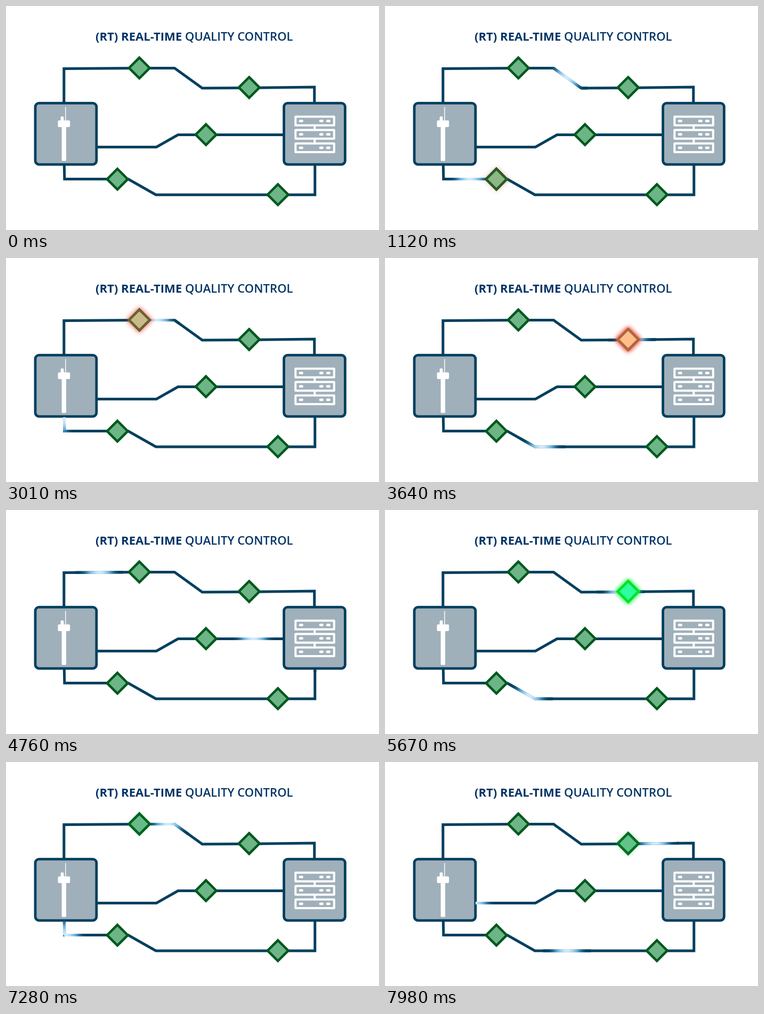
Write an HTML page with a canvas that moves like this. It is 700 px wide and 420 px high and loops after 8 s.

```html
<!DOCTYPE html>
<html lang="en">
<head>
<meta charset="utf-8">
<title>Real-time quality control</title>
<style>
  html, body { margin: 0; width: 100%; height: 100%; overflow: hidden; background: #fff; }
  canvas, svg { position: absolute; left: 0; top: 0; display: block; }
  text { font: 600 22.1px "Open Sans", sans-serif; fill: #003366; }
  .strong { font-weight: 700; }
</style>
</head>
<body>
<canvas id="stage" width="700" height="420"></canvas>
<svg width="700" height="420" viewBox="0 0 700 420">
  <text x="168" y="65"><tspan class="strong">(RT) REAL-TIME</tspan> QUALITY CONTROL</text>
</svg>
<script>
const ctx = document.getElementById('stage').getContext('2d');
ctx.translate(0.3, 0.5);

const LOOP = 8000, TICK = 70, PERIOD = 2100, HALF_PULSE = 45;
const PASS_FROM = 4000; // checks fail (orange) before this time and pass (green) after it
const NAVY = [0, 63, 94], SKY = [105, 175, 220], SHINE = [208, 236, 252];
const IDLE = { fill: [109, 181, 134], edge: [0, 88, 30] };
const FAIL = { fill: [255, 190, 140], edge: [172, 104, 58], glow: '245,45,35' };
const PASS = { fill: [46, 255, 160], edge: [0, 228, 40], glow: '30,240,80' };

// first: time the pulse centre enters; speed in px per ms; checks: [x, y, distance along the track]
const tracks = [
  { points: [[108.5, 180], [108.5, 117], [250, 116], [316, 116], [368, 153.5], [456, 153], [578.5, 151.5], [578.5, 180]],
    first: 140, speed: 0.307, checks: [[250, 115.7, 206], [456, 152.3, 424]] },
  { points: [[169.5, 264], [282, 264], [322.5, 241], [520, 241]],
    first: 1692, speed: 0.31, checks: [[375, 240.7, 210]] },
  { points: [[109, 298], [109.5, 324], [229, 324], [281, 353.5], [579.5, 353.5], [579.5, 298]],
    first: 900, speed: 0.34, checks: [[208.8, 324.2, 126], [510, 353.2, 435]] }
];

for (const track of tracks) {
  track.length = 0;
  track.parts = track.points.slice(1).map((b, i) => {
    const a = track.points[i], size = Math.hypot(b[0] - a[0], b[1] - a[1]);
    const part = { a, b, size, from: track.length };
    track.length += size;
    return part;
  });
}

const clamp = v => Math.max(0, Math.min(1, v));
const mix = (a, b, k) => a.map((v, i) => v + (b[i] - v) * k);
const rgb = c => `rgb(${c.map(Math.round)})`;

function pointAt(track, d) {
  const part = track.parts.find(p => d <= p.from + p.size) || track.parts[track.parts.length - 1];
  return mix(part.a, part.b, (d - part.from) / part.size);
}

function line(points, color, width) {
  ctx.beginPath();
  points.forEach(p => ctx.lineTo(...p));
  ctx.strokeStyle = color;
  ctx.lineWidth = width;
  ctx.stroke();
}

function box(x, y, w, h, r) {
  ctx.beginPath();
  ctx.roundRect(x, y, w, h, r);
}

function panel(x) {
  box(x, 181.6, 114.8, 115, 7);
  ctx.fillStyle = '#a0b0ba';
  ctx.fill();
  ctx.strokeStyle = rgb(NAVY);
  ctx.lineWidth = 4.8;
  ctx.stroke();
}

function solid(x, y, w, h, r) {
  box(x, y, w, h, r);
  ctx.fillStyle = '#fff';
  ctx.fill();
}

function drawFloat() {
  solid(110.8, 189, 1.4, 26, 0);
  solid(102.3, 206.5, 5.8, 10, 2);
  solid(97.2, 214, 22.6, 12.5, 2);
  solid(104.3, 222, 8.4, 68, 1.5);
}

function drawServers() {
  solid(577, 222, 4, 36, 0);
  for (const y of [207, 232, 257.3]) {
    box(543, y, 72.5, 16.2, 0.5);
    ctx.fillStyle = '#a0b0ba';
    ctx.fill();
    ctx.strokeStyle = '#fff';
    ctx.lineWidth = 4;
    ctx.stroke();
    for (const x of [549.5, 587.5, 600.5]) solid(x, y + 5.8, 8, 4.6, 2);
  }
}

function drawPulse(track, centre) {
  const start = Math.max(0, centre - HALF_PULSE);
  const end = Math.min(track.length, centre + HALF_PULSE);
  for (let d = start; d < end; d++) {
    const k = Math.cos((d - centre) / HALF_PULSE * Math.PI / 2) ** 3;
    const color = k < 0.5 ? mix(NAVY, SKY, k * 2) : mix(SKY, SHINE, k * 2 - 1);
    line([pointAt(track, d), pointAt(track, Math.min(end, d + 2))], rgb(color), 5);
  }
}

function diamond(x, y, look, level) {
  const r = 19.4;
  ctx.beginPath();
  ctx.moveTo(x, y - r);
  ctx.lineTo(x + r, y);
  ctx.lineTo(x, y + r);
  ctx.lineTo(x - r, y);
  ctx.closePath();
  ctx.fillStyle = rgb(mix(IDLE.fill, look.fill, level));
  ctx.strokeStyle = rgb(mix(IDLE.edge, look.edge, level));
  ctx.lineWidth = 4.6;
  if (level > 0) {
    ctx.shadowColor = `rgba(${look.glow},${level})`;
    ctx.shadowBlur = 9;
    ctx.stroke();
    ctx.stroke();
  }
  ctx.shadowColor = 'transparent';
  ctx.fill();
  ctx.stroke();
}

function drawCheck(track, [x, y, at], t) {
  const reach = track.first + at / track.speed;
  const round = Math.max(0, Math.round((t - reach) / PERIOD));
  const moment = reach + round * PERIOD;
  const level = clamp((180 - Math.abs(t - moment)) / 130);
  diamond(x, y, moment < PASS_FROM ? FAIL : PASS, level);
}

function draw(t) {
  ctx.fillStyle = '#fff';
  ctx.fillRect(-1, -1, 702, 422);
  tracks.forEach(track => line(track.points, rgb(NAVY), 5));
  panel(54.7);
  panel(521.3);
  drawFloat();
  drawServers();
  for (const track of tracks) {
    for (let start = track.first; start < LOOP + PERIOD; start += PERIOD) {
      drawPulse(track, (t - start) * track.speed);
    }
    track.checks.forEach(check => drawCheck(track, check, t));
  }
}

function frame() {
  const t = performance.now() % LOOP;
  draw(Math.floor(t / TICK) * TICK);
  requestAnimationFrame(frame);
}
frame();
</script>
</body>
</html>
```
